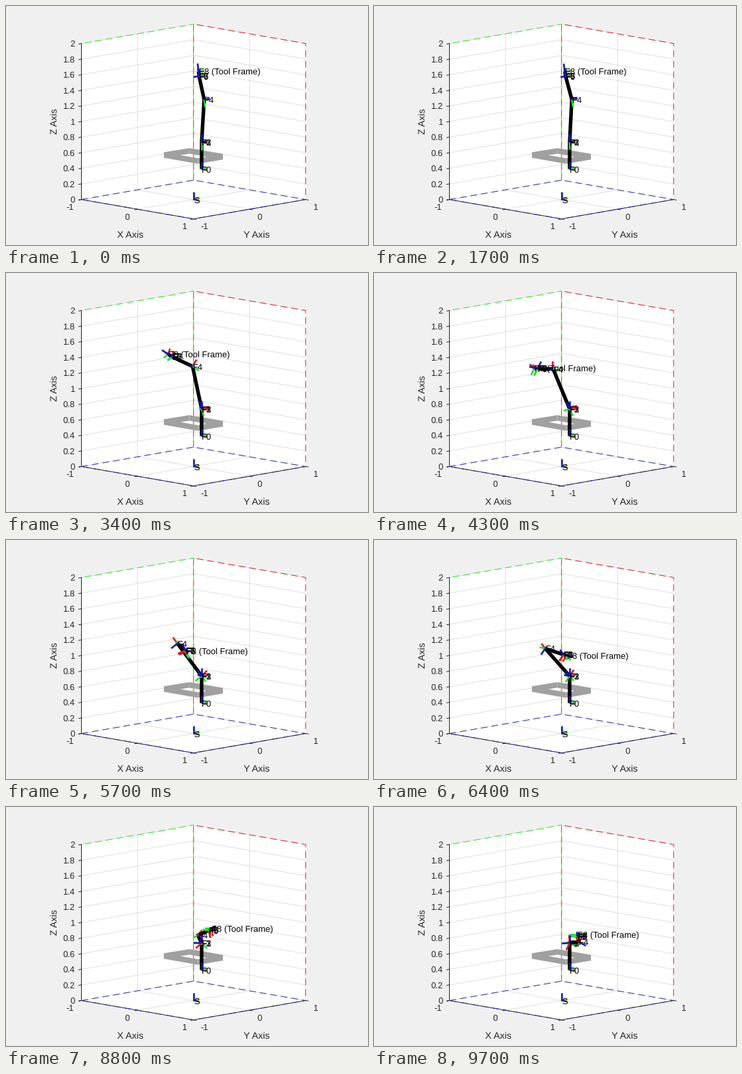
Recreate the animation shown at these times as a matplotlib script. Size 544 by 360 pixels, loop 9800 ms.

```python
import numpy as np
import matplotlib.pyplot as plt
from matplotlib.animation import FuncAnimation
from matplotlib.collections import LineCollection

W, H, DPI = 544, 360, 100
PX = 72 / DPI
FRAMES, HOLD = 98, 16
STEPS = FRAMES - 1 - HOLD

ORIGIN = np.array([281.3, 291.0])
PROJECT = np.array([[84.2, 14.6], [84.2, -14.6], [0, -117.5]])
BASE = np.array([293.5, 245.0])
UP = np.array([0.0, 0.0, 1.0])
EAST = np.array([1.0, 0.0, 0.0])
AXIS_LEN = 0.1
SHOULDER, UPPER, FORE, TOOL, OFFSET = 0.346, 0.55, 0.3, 0.06, 0.045

INK = "#262626"
RGB = ["#f01010", "#18e428", "#1010d0"]

plt.rcParams["font.family"] = "Liberation Sans"
plt.rcParams["text.hinting"] = "none"
fig = plt.figure(figsize=(W / DPI, H / DPI), dpi=DPI, facecolor="#f0f0f0")
ax = fig.add_axes([0, 0, 1, 1])
ax.set_xlim(-0.5, W - 0.5)
ax.set_ylim(H - 0.5, -0.5)
ax.axis("off")


def world(x, y, z):
    return ORIGIN + np.array([x, y, z]) @ PROJECT


def path(points, color, width=1, **style):
    xs, ys = np.array(points).T
    return ax.plot(xs, ys, color=color, lw=width * PX, **style)[0]


def poly(points, color, z):
    ax.fill(*np.array(points).T, color=color, lw=0, zorder=z)


def label(text, x, y, size=13, color=INK, ha="center", z=3):
    # Anchored on the baseline so capitals sit centred on y.
    return ax.text(x, y + 0.36 * size, text, fontsize=size * PX, color=color,
                   ha=ha, va="baseline", zorder=z)


def draw_box():
    left = [world(*p) for p in [(-1, -1, 0), (-1, -1, 2), (-1, 1, 2), (-1, 1, 0)]]
    right = [world(*p) for p in [(-1, 1, 0), (-1, 1, 2), (1, 1, 2), (1, 1, 0)]]
    floor = [world(*p) for p in [(-1, -1, 0), (-1, 1, 0), (1, 1, 0), (1, -1, 0)]]
    for face in (left, right, floor):
        poly(face, "white", 0)

    grid = [[world(-1, -1, z), world(-1, 1, z), world(1, 1, z)]
            for z in np.arange(0, 2.01, 0.2)]
    grid.append([world(-1, 0, 2), world(-1, 0, 0), world(1, 0, 0)])
    grid.append([world(0, 1, 2), world(0, 1, 0), world(0, -1, 0)])
    for line in grid:
        path(line, "#dfdfdf", zorder=1)

    dashes = dict(linestyle=(0, (10, 6)), dash_capstyle="butt")
    path(right, "#d82020", zorder=2, **dashes)
    path(left, "#20f020", zorder=2.1, **dashes)
    path([world(-1, -1, 2), world(-1, -1, 0), world(1, -1, 0), world(1, 1, 0)],
         INK, zorder=2.2)
    path(floor + floor[:1], "#2828c0", zorder=2.3, **dashes)


def draw_ticks():
    tick = np.array([4, 0.7])
    for i in range(11):
        x, y = world(-1, -1, 0.2 * i)
        path([(x, y), (x - 4, y + 0.7)], INK, zorder=2.2)
        label(f"{0.2 * i:.1f}".replace(".0", ""), 103, y, ha="right")
    for i, name in enumerate(("-1", "0", "1")):
        x_end, y_end = world(i - 1, -1, 0), world(1, i - 1, 0)
        path([x_end, x_end + tick * (-1, 1)], INK, zorder=2.2)
        path([y_end, y_end + tick], INK, zorder=2.2)
        label(name, 95.7 + 85.5 * i, 302.3 + 14.3 * i)
        label(name, 298 + 83 * i, 331 - 14.6 * i)
    label("X Axis", 186, 343.6, 14.3)
    label("Y Axis", 376, 343.6, 14.3)
    ax.text(73, 173, "Z Axis", fontsize=14.3 * PX, color=INK, rotation=90,
            ha="center", va="center")


def draw_table():
    corners = np.array([(237, 224), (275, 217.8), (325.5, 226.6), (288, 233)])
    rise = np.array([0, 4.2])
    for a, b in zip(corners, np.roll(corners, -1, axis=0)):
        poly([a - rise, b - rise, b + rise, a + rise], "#a0a0a0", 4)


def triad(origin, x, z):
    axes = (x, np.cross(z, x), z)
    return [[origin, origin + AXIS_LEN * v @ PROJECT] for v in axes]


def solve(step):
    """Screen joints and coordinate frames of the arm after `step` moves."""
    k = step / STEPS
    turn = np.radians(150 * k)
    tilt = np.radians(75 * k)
    bend = np.radians(9 + 141 * k)

    x1 = np.array([np.cos(turn), np.sin(turn), 0])
    y1 = np.cross(UP, x1)
    upper = np.cos(tilt) * UP - np.sin(tilt) * x1
    across = -np.cos(tilt) * x1 - np.sin(tilt) * UP
    fold = np.cos(turn) * across - np.sin(turn) * y1
    fore = np.cos(bend) * upper + np.sin(bend) * fold
    x4 = np.sin(bend) * upper - np.cos(bend) * fold
    z4 = np.cross(fore, x4)
    x5 = np.cos(turn) * x4 + np.sin(turn) * z4

    elbow = UPPER * upper - OFFSET * fold
    wrist = elbow - OFFSET * x4 + FORE * fore
    tool = wrist + TOOL * fore
    shoulder = BASE + SHOULDER * UP @ PROJECT
    elbow, wrist, tool = (shoulder + p @ PROJECT for p in (elbow, wrist, tool))

    frames = [
        (BASE, EAST, UP),
        (shoulder, x1, UP),
        (shoulder, -across, y1),
        (shoulder, -fold, upper),
        (elbow, x4, z4),
        (wrist, x5, fore),
        (wrist, x5, np.cross(x5, fore)),
        (wrist, x5, fore),
        (tool, x5, fore),
    ]
    return [BASE, shoulder, elbow, wrist, tool], frames


draw_box()
draw_ticks()
draw_table()

names = [f"F{i}" for i in range(8)] + ["F8 (Tool Frame)"]
arm = path([BASE, BASE], "black", 5.4, zorder=5, solid_capstyle="butt",
           solid_joinstyle="round")
triads = LineCollection([], colors=np.repeat(RGB, len(names) + 1),
                        linewidths=2.6 * PX, zorder=6)
ax.add_collection(triads, autolim=False)
label("S", *(ORIGIN + (0.5, 0.6)), color="black", ha="left", z=7)
tags = [label(name, 0, 0, color="black", ha="left", z=7) for name in names]


def update(frame):
    joints, frames = solve(max(0, frame - HOLD))
    arm.set_data(*np.array(joints).T)
    for tag, (origin, _, _) in zip(tags, frames):
        tag.set_position(origin + (0.3, 5))
    axes = [triad(*f) for f in [(ORIGIN, EAST, UP), *frames]]
    # Grouped by colour, so blue axes lie over green and red ones.
    triads.set_segments([line for group in zip(*axes) for line in group])
    return [arm, triads, *tags]


anim = FuncAnimation(fig, update, frames=FRAMES, interval=100, repeat=True,
                     repeat_delay=0, blit=False)
plt.show()
```
